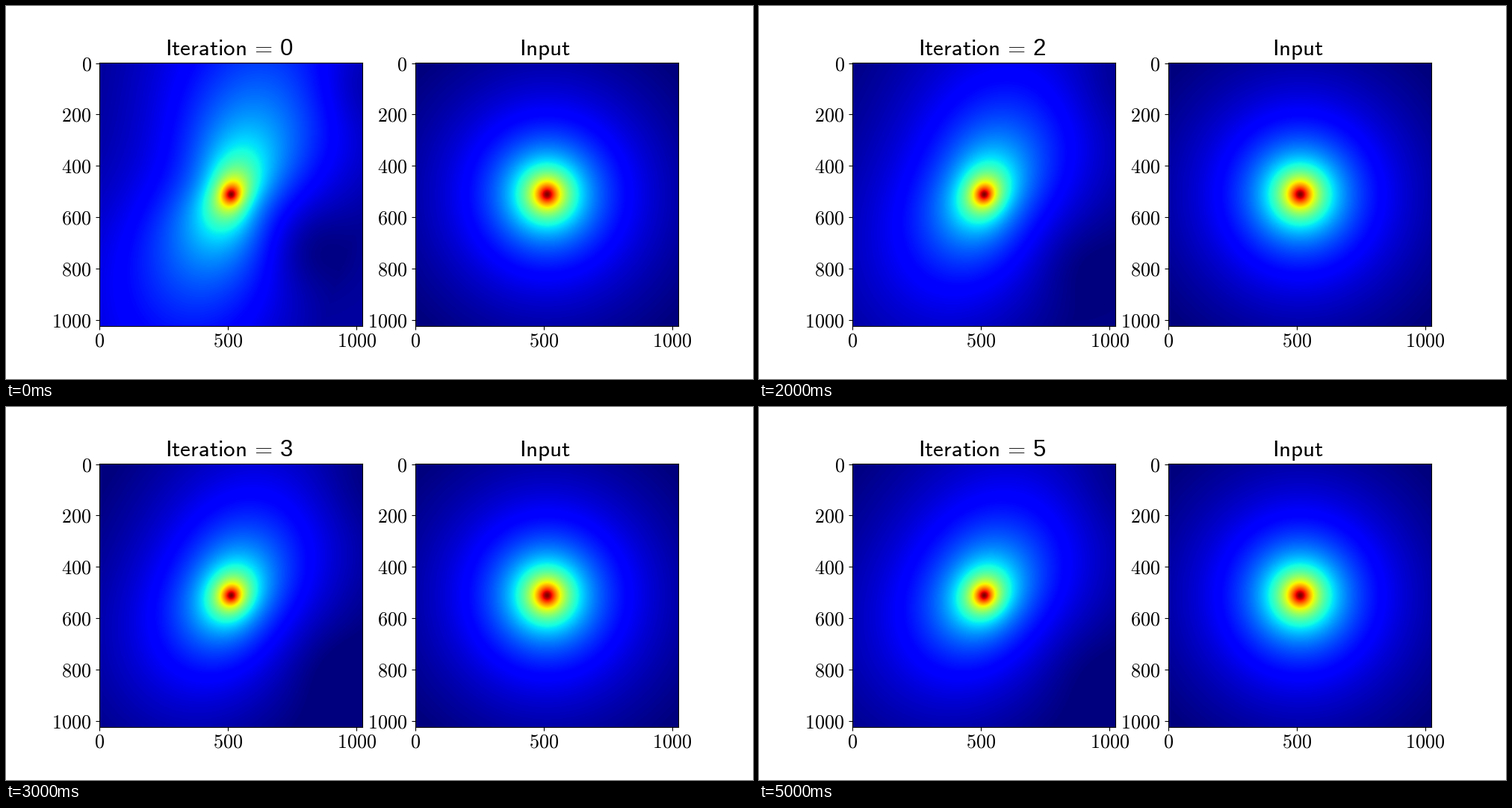
Recreate the animation shown at these times as a matplotlib script. Size 1000x500 px, loop 6000 ms.

```python
import numpy as np
import matplotlib.pyplot as plt
from matplotlib.animation import FuncAnimation

plt.rcParams["mathtext.fontset"] = "cm"
plt.rcParams["font.family"] = "Liberation Sans"

STEPS = 6
SIZE = 1024            # data units along one side
SIDE = 352.27          # the same side in pixels
GRID = 512
SCALE, CORE = 29, 5    # falloff and softening of the profile, in pixels
EDGE = 237             # radius where the profile reaches zero

axis = ((np.arange(GRID) + 0.5) / GRID - 0.5) * SIDE
X, Y = np.meshgrid(axis, axis)       # pixels from the centre, y down
R = np.hypot(X, Y)
THETA = np.degrees(np.arctan2(-Y, X))


def profile(r):
    """Cuspy radial profile, 1 in the centre and 0 at EDGE."""
    def bare(q):
        return 1 / (1 + (np.hypot(q, CORE) - CORE) / SCALE)
    return np.clip((bare(r) - bare(EDGE)) / (1 - bare(EDGE)), 0, 1)


def wave(order, phase):
    return np.cos(np.radians(order * (THETA - phase)))


def dip(x, y, width):
    return np.exp(-((X - x) ** 2 + (Y - y) ** 2) / (2 * width ** 2))


def estimate(n):
    """Profile stretched by angular modes that fade as n grows."""
    fade = (1 + n) ** -0.6
    swing = (-0.5) ** n              # damped overshoot of the brightness
    grow = R / (R + 50)
    spread = -0.18 + (0.3 + 0.15 * swing) * R**2 / (R**2 + 80**2)
    oval = 0.55 * fade * grow * wave(2, 67 - 3 * n)
    shift = 0.15 * grow * wave(1, 110)
    value = profile(R * np.exp(-spread - oval - shift))
    floor = 0.03 * swing
    shade = 0.05 * dip(150 - 45 * fade, 110 - 40 * fade, 40)
    shade += 0.06 * dip(174, -150, 50)
    return floor + (1 - floor) * value - fade * shade


def panel(ax, data, title):
    image = ax.imshow(data, cmap="jet", vmin=0, vmax=1,
                      extent=(-0.5, SIZE - 0.5, SIZE - 0.5, -0.5))
    ax.set_xticks(range(0, 1001, 500))
    ax.set_yticks(range(0, 1001, 200))
    ax.xaxis.set_major_formatter("${x:.0f}$")
    ax.yaxis.set_major_formatter("${x:.0f}$")
    ax.tick_params(labelsize=18.8)
    ax.tick_params(axis="x", pad=2.8)
    ax.tick_params(axis="y", pad=4)
    return image, ax.set_title(title, fontsize=22.4, x=0.494, pad=7.2)


def heading(n):
    return rf"$\mathsf{{Iteration\,=\,}}${n}"


maps = [estimate(n) for n in range(STEPS)]
fig, (left, right) = plt.subplots(1, 2, figsize=(10, 5), dpi=100)
picture, caption = panel(left, maps[0], heading(0))
panel(right, profile(R), r"$\mathsf{Input}$")


def update(n):
    picture.set_data(maps[n])
    caption.set_text(heading(n))
    return picture, caption


anim = FuncAnimation(fig, update, frames=STEPS, interval=1000,
                     repeat=True, repeat_delay=0)
plt.show()
```
